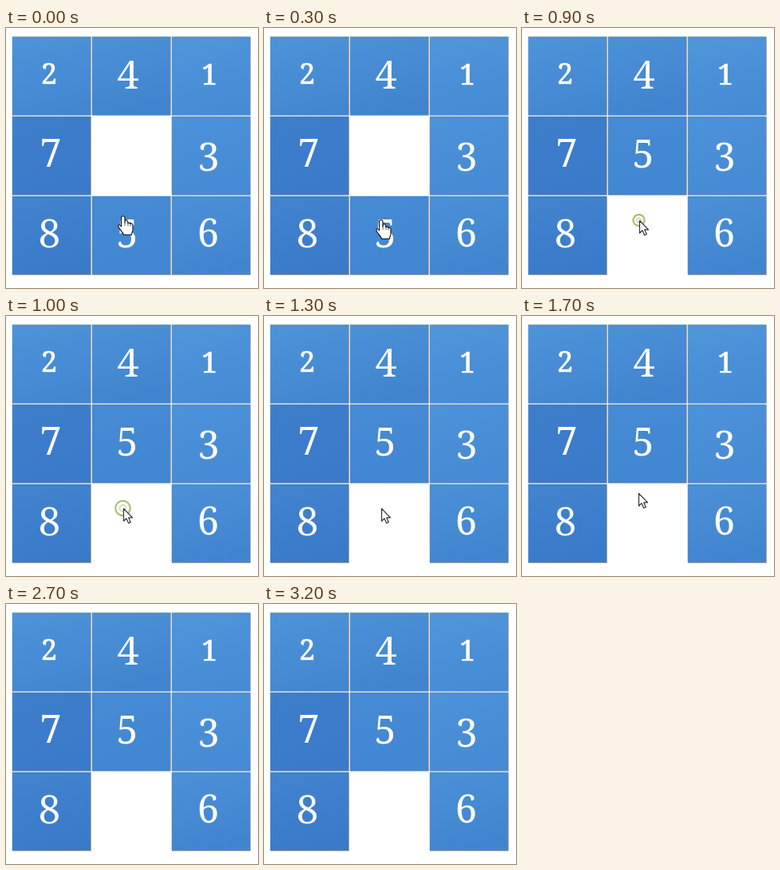
These frames come from a looping animation (316x326 px, 3300 ms). An HTML page:

```html
<!DOCTYPE html>
<html lang="en">
<head>
<meta charset="utf-8">
<title>Sliding puzzle</title>
<style>
html, body { margin: 0; width: 100%; height: 100%; overflow: hidden; background: #fff; }
svg { display: block; width: 316px; height: 326px; }
text { font-family: "Noto Serif", serif; fill: #fff; text-anchor: middle; }
#moving, .pointer, .hand, .arrow, .ring, .core { animation: 3300ms step-end infinite; }

#moving { animation-name: slide; }
@keyframes slide {
  0% { transform: translateY(100px); }
  27.27%, 100% { transform: none; }
}

.pointer { animation-name: travel; }
@keyframes travel {
  0% { transform: translate(147px, 236px); }
  3.03% { transform: translate(147px, 238px); }
  6.06% { transform: translate(147px, 240px); }
  9.09% { transform: translate(147px, 241px); }
  45.45% { transform: translate(147px, 238px); }
  48.48% { transform: translate(146px, 231px); }
  51.51% { transform: translate(146px, 222px); }
  54.54% { transform: translate(146px, 217px); }
  57.57%, 100% { transform: translate(146px, 214px); }
}

.hand { animation-name: press; }
@keyframes press {
  0% { visibility: visible; }
  27.27%, 100% { visibility: hidden; }
}

.arrow { animation-name: point; }
@keyframes point {
  0% { visibility: hidden; }
  27.27% { visibility: visible; }
  63.63%, 100% { visibility: hidden; }
}

.ring { fill: #fbfbec; fill-opacity: .35; stroke-width: 2; animation-name: ripple; }
@keyframes ripple {
  0% { r: 0; opacity: 0; stroke: #c4b04a; }
  21.21% { r: 2px; opacity: .9; stroke: #c4b04a; }
  24.24% { r: 4px; opacity: 1; stroke: #b9ae48; }
  27.27% { r: 7px; opacity: 1; stroke: #a5b45a; }
  30.3% { r: 9.3px; opacity: 1; stroke: #9fba72; }
  33.33% { r: 11px; opacity: .55; stroke: #a9c283; }
  36.36% { r: 12.5px; opacity: .2; stroke: #a9c283; }
  39.39%, 100% { r: 0; opacity: 0; stroke: #a9c283; }
}

.core { fill: none; stroke: #c3d0a2; stroke-width: 1.4; animation-name: echo; }
@keyframes echo {
  0% { r: 0; opacity: 0; }
  24.24% { r: 1.2px; opacity: 1; }
  27.27% { r: 2.8px; opacity: 1; }
  30.3% { r: 4px; opacity: 1; }
  33.33% { r: 5.5px; opacity: .5; }
  36.36%, 100% { r: 0; opacity: 0; }
}
</style>
</head>
<body>
<svg viewBox="0 0 316 326">
  <defs id="defs"></defs>
  <g id="board"></g>
  <g transform="translate(146.5 241)">
    <circle class="ring"/>
    <circle class="core"/>
  </g>
  <g class="pointer" stroke-linejoin="round">
    <g class="hand">
      <path fill="#fff" stroke="#222" stroke-width="1.2" d="M-2.4 13V1.6C-2.4-.9 2-.9 2 1.6V8.2C3-.0 6 7 6 9.2C7 7.2 9 8 9 10C10 8.6 12 9.4 12 11.4V17C12 19 10.6 20.4 10.4 23.4H.6C.4 21-3.2 18.4-5.4 14.4C-7.8 10.4-4 9.6-2.4 13Z"/>
      <path fill="none" stroke="#444" stroke-width=".8" d="M2 8v4M6 9.4v3M9 10.4v2.4"/>
    </g>
    <path class="arrow" fill="#fff" stroke="#333" stroke-width="1.2" d="M.5 .5V16.2L4 12.8L6.6 18.8L9.2 17.6L6.7 11.8H11.6Z"/>
  </g>
</svg>
<script>
const NS = "http://www.w3.org/2000/svg";
const board = document.getElementById("board");
const defs = document.getElementById("defs");

function add(parent, name, attrs, label) {
  const el = document.createElementNS(NS, name);
  for (const key in attrs) el.setAttribute(key, attrs[key]);
  if (label) el.textContent = label;
  return parent.appendChild(el);
}

// digit, column, row, centre x, baseline, font size, top colour, bottom colour
const tiles = [
  ["2", 0, 0, 54, 70, 36, "#4c93d9", "#4286d0"],
  ["4", 1, 0, 153, 76, 49, "#4a90d7", "#4083ce"],
  ["1", 2, 0, 255, 71, 36, "#4e95db", "#468bd5"],
  ["7", 0, 1, 56, 174, 49, "#3d7ecb", "#3a7aca"],
  ["5", 1, 1, 152, 174.5, 49, "#458ad3", "#4186d1"],
  ["3", 2, 1, 254, 178.5, 49, "#4c92d9", "#458ad4"],
  ["8", 0, 2, 54.5, 274.5, 49, "#4183cf", "#397ac9"],
  ["6", 2, 2, 253.5, 273.5, 49, "#4a8fd7", "#4084cf"]
];

for (const [digit, col, row, cx, base, size, top, bottom] of tiles) {
  const x = 8 + col * 100, y = 11 + row * 100;
  const grad = add(defs, "linearGradient", { id: "g" + digit, x1: .35, y1: 0, x2: .65, y2: 1 });
  add(grad, "stop", { offset: 0, "stop-color": top });
  add(grad, "stop", { offset: 1, "stop-color": bottom });

  const tile = add(board, "g", digit === "5" ? { id: "moving" } : {});
  add(tile, "rect", { x: x - 1, y: y - 1, width: 99, height: 99, fill: "#dcdfdf" });
  add(tile, "rect", { x, y, width: 98, height: 98, fill: `url(#g${digit})` });
  add(tile, "path", { d: `M${x} ${y + 98.5}h98.5v-98.5`, fill: "none", stroke: "#b1aaa3" });
  const small = size < 40;
  add(tile, "text", {
    x: cx, y: base, "font-size": size,
    stroke: "#fff", "stroke-width": small ? .7 : 0
  }, digit);
}
</script>
</body>
</html>
```
